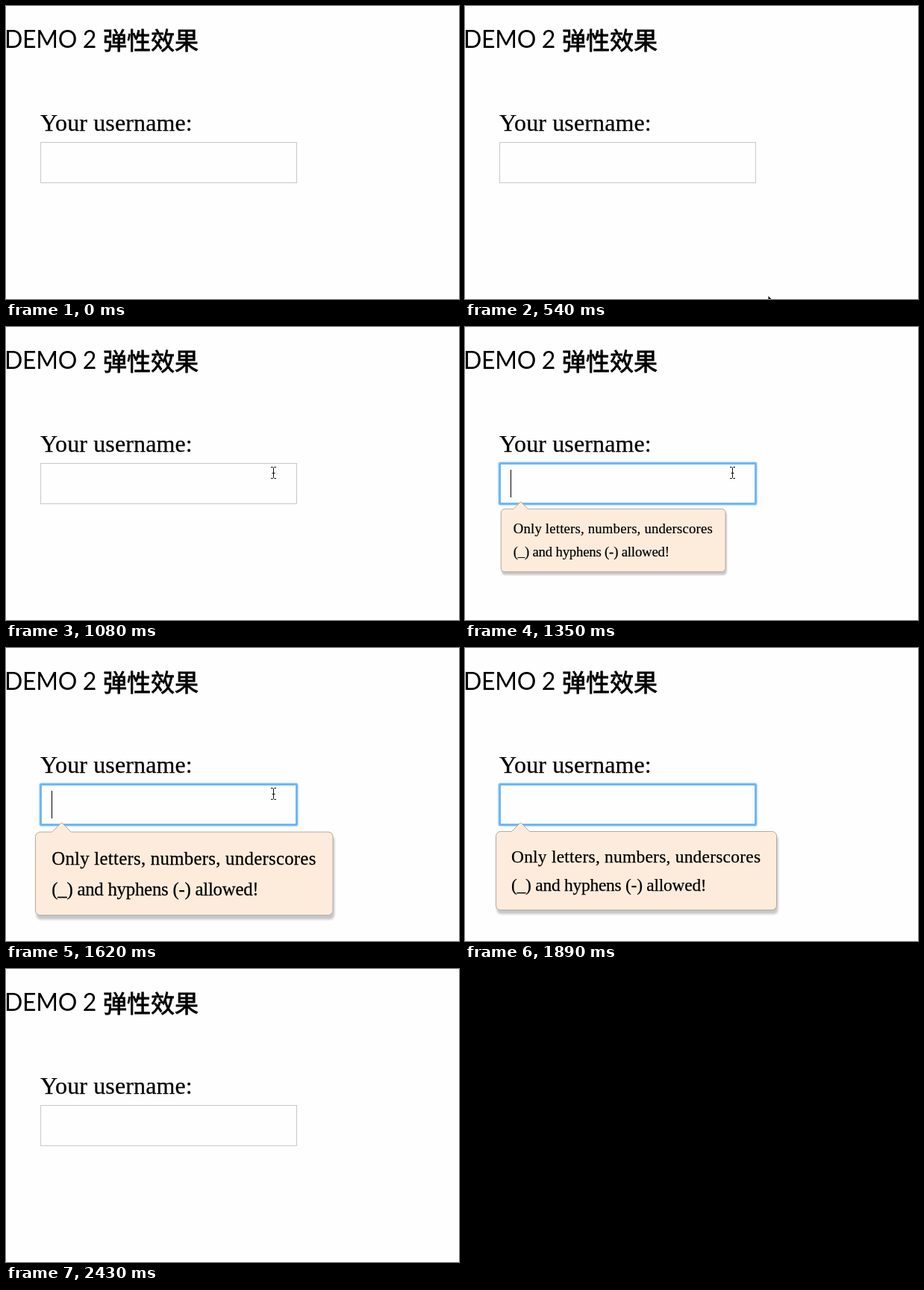
Write an HTML page that moves like this. It is 607 px wide and 392 px high and loops after 3.24 s.

```html
<!DOCTYPE html>
<html lang="zh">
<head>
<meta charset="utf-8">
<title>DEMO 2</title>
<style>
  html, body { margin: 0; width: 100%; height: 100%; overflow: hidden; background: #fefefe; }
  svg { display: block; width: 100%; height: 100%; }
  .head { font: 32px Lato, sans-serif; letter-spacing: -.3px; }
  .cjk { font: 400 32px "Noto Sans CJK SC", "Noto Sans CJK", sans-serif; stroke: #000; stroke-width: .8px; }
  .serif { font-family: "Liberation Serif", serif; stroke: #000; stroke-width: .25px; }
  .label { font-size: 32px; letter-spacing: .13px; }
  .tip { font-size: 23.4px; }
</style>
</head>
<body>
<svg viewBox="0 0 607 392">
  <defs>
    <filter id="blur" x="-10%" y="-20%" width="120%" height="140%">
      <feGaussianBlur stdDeviation="1.5"/>
    </filter>
  </defs>
  <rect width="607" height="392" fill="#fefefe"/>
  <text class="head" x="-2" y="56">DEMO 2</text>
  <text class="cjk" x="130" y="58">弹性效果</text>
  <text class="serif label" x="46" y="167">Your username:</text>

  <rect id="idle" x="46.5" y="182.5" width="343" height="54" fill="#fefefe" stroke="#c8c8c8"/>
  <g id="focus" fill="#fefefe">
    <rect x="46" y="182" width="344" height="55" rx="2" stroke="#8cc6f5" stroke-opacity=".35" stroke-width="5"/>
    <rect x="46.5" y="182.5" width="343" height="54" rx="1" stroke="#6fb8f3" stroke-width="3"/>
  </g>
  <path id="caret" d="M61.5 191V228" stroke="#000"/>

  <g id="bubble">
    <rect x="-33" y="15" width="377" height="106" rx="6" opacity=".22" filter="url(#blur)"/>
    <path d="M-28 10.5H-13L-1 -1.500L11 10.5H336a6 6 0 0 1 6 6V109.500a6 6 0 0 1 -6 6H-28a6 6 0 0 1 -6 -6V16.500a6 6 0 0 1 6 -6Z"
      fill="#fdecdc" stroke="#b5a99e" vector-effect="non-scaling-stroke"/>
    <g class="serif tip">
      <text x="-13.5" y="51.6" letter-spacing=".26">Only letters, numbers, underscores</text>
      <text x="-13.5" y="90.2" letter-spacing="-.22">(_) and hyphens (-) allowed!</text>
    </g>
  </g>

  <path id="arrow" d="M406.500 388V404L410 400.500L412.500 406L415 405L412.500 399.500H417.500Z"/>
  <path id="beam" fill="none" stroke="#111"
    d="M355 187.500H357.500L358.500 188.500L359.500 187.500H362M358.500 188.500V201.500M355 202.500H357.500L358.500 201.500L359.500 202.500H362M356.500 195.500H360.500"/>
</svg>
<script>
  const LOOP = 3240;
  const el = id => document.getElementById(id);
  const [idle, focus, caret, bubble, arrow, beam] =
    ["idle", "focus", "caret", "bubble", "arrow", "beam"].map(el);

  const show = (node, on) => node.setAttribute("visibility", on ? "visible" : "hidden");

  // The tooltip springs past its full size, then settles.
  const bubbleScale = t => t < 1620 ? 0.8 : t < 1890 ? 1.06 : 1;

  function draw(t) {
    const within = (from, to) => t >= from && t < to;
    const focused = within(1350, 2430);
    show(idle, !focused);
    show(focus, focused);
    show(bubble, focused);
    show(caret, within(1350, 1890));
    show(arrow, within(540, 810));
    show(beam, within(810, 1890));
    beam.setAttribute("transform", t < 1080 ? "translate(2 1)" : "translate(0 0)");
    bubble.setAttribute("transform", `translate(75.5 235) scale(${bubbleScale(t)})`);
  }

  const start = performance.now();
  function tick() {
    draw((performance.now() - start) % LOOP);
    requestAnimationFrame(tick);
  }
  tick();
</script>
</body>
</html>
```
